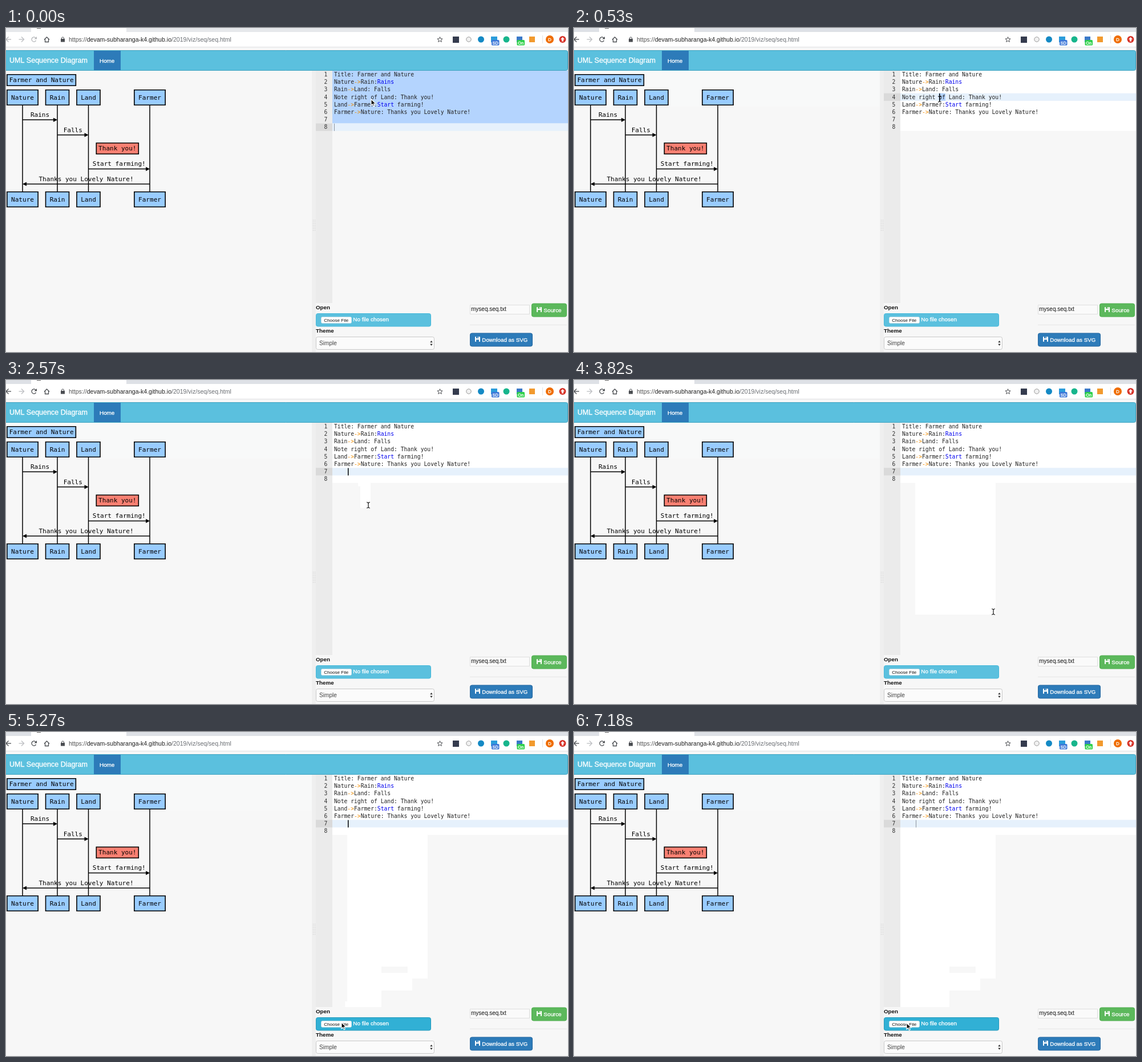
Recreate the animation shown at these times as an HTML page with a canvas. Size 985 px wide and 569 px high, loop 8000 ms.

```html
<!DOCTYPE html>
<html lang="en">
<head>
<meta charset="utf-8">
<title>UML Sequence Diagram</title>
<style>
html, body { margin: 0; width: 100%; height: 100%; overflow: hidden; background: #f7f7f7; }
canvas { display: block; }
</style>
</head>
<body>
<canvas id="stage" width="985" height="569"></canvas>
<script>
const ctx = document.getElementById('stage').getContext('2d');
const LOOP = 8000, TICK = 122, TICK_START = 52;
const FOCUS = 310, PICK = 530, CLICK = 1260, HOVER = 4440, TIP = 5850, TIP_END = 7180;
const SANS = '"Liberation Sans", Arial, sans-serif';
const MONO = '"DejaVu Sans Mono", monospace';
const PAGE = '#f7f7f7', INK = '#111', SELECT = '#b4d4fe', ACTIVE = '#e6f1fc';
const ROW_H = 13.22, ED_X = 575, ED_Y = 75, ED_FONT = '9.7px ' + MONO;
const rowTop = i => ED_Y + i * ROW_H;

const code = [
  'Title: Farmer and Nature',
  'Nature->Rain:Rains',
  'Rain->Land: Falls',
  'Note right of Land: Thank you!',
  'Land->Farmer:Start farming!',
  'Farmer->Nature: Thanks you Lovely Nature!',
  '', ''
];

// pointer key points: time, x, y
const keys = [
  [0, 640, 125], [PICK, 641, 125], [700, 641, 125], [1028, 621, 166],
  [2320, 621, 166], [2614, 645, 258], [2858, 735, 407],
  [3850, 735, 407], [3956, 708, 428], [4078, 654, 449], [4200, 603, 478], [4600, 588, 510],
  [5300, 588, 510], [5780, 579, 510], [6300, 579, 510], [6720, 583, 511], [LOOP, 583, 511]
];

function pointerAt(t) {
  const time = Math.max(0, Math.floor((t - TICK_START) / TICK) * TICK + TICK_START);
  const i = keys.findIndex(k => k[0] > time);
  const [t0, x0, y0] = keys[i - 1], [t1, x1, y1] = keys[i];
  const f = (time - t0) / (t1 - t0);
  return { x: x0 + (x1 - x0) * f, y: y0 + (y1 - y0) * f, arrow: time < FOCUS - TICK || time >= 4200 + TICK };
}

const caretOn = t => t >= TIP_END || (t + 732) % 986 < 600;

// each pointer step repaints the area between its old and new place, and the caret if it blinked
const repaints = [];
for (let t = TICK_START + 10 * TICK; t < TIP_END; t += TICK) {
  const a = pointerAt(t - TICK), b = pointerAt(t);
  if (a.x === b.x && a.y === b.y) continue;
  const r = { t, x0: Math.min(a.x, b.x) - 4, y0: Math.min(a.y, b.y) - 5,
    x1: Math.max(a.x, b.x) + 4, y1: Math.max(a.y, b.y) + 5 };
  if (caretOn(t) !== caretOn(t - TICK)) {
    r.x0 = Math.min(r.x0, 598);
    r.y0 = rowTop(6);
  }
  repaints.push(r);
}
repaints.push({ t: TIP, x0: 567, y0: rowTop(6), x1: 639, y1: 544 });

function rect(x, y, w, h, fill) {
  ctx.fillStyle = fill;
  ctx.fillRect(x, y, w, h);
}

function paint(fill, stroke, lw = 1) {
  if (fill) { ctx.fillStyle = fill; ctx.fill(); }
  if (stroke) { ctx.strokeStyle = stroke; ctx.lineWidth = lw; ctx.stroke(); }
}

function box(x, y, w, h, r, fill, stroke, lw) {
  ctx.beginPath();
  ctx.roundRect(x, y, w, h, r);
  paint(fill, stroke, lw);
}

function disc(x, y, r, fill, stroke) {
  ctx.beginPath();
  ctx.arc(x, y, r, 0, 7);
  paint(fill, stroke);
}

function path(pts, stroke, lw, fill) {
  ctx.beginPath();
  for (let i = 0; i < pts.length; i += 2) ctx.lineTo(pts[i], pts[i + 1]);
  if (fill) ctx.closePath();
  paint(fill, stroke, lw);
}

function text(s, x, y, font, fill = INK, align = 'left') {
  ctx.font = font;
  ctx.textAlign = align;
  ctx.fillStyle = fill;
  ctx.fillText(s, x, y);
  if (fill === '#fff') {
    ctx.strokeStyle = fill;
    ctx.lineWidth = .3;
    ctx.strokeText(s, x, y);
  }
}
const sans = (s, x, y, size, fill, align) => text(s, x, y, size + 'px ' + SANS, fill, align);
const bold = (s, x, y, size) => text(s, x, y, 'bold ' + size + 'px ' + SANS);

function navArrow(x, dir, color) {
  path([x - 4.5, 20, x + 4.5, 20], color, 1.3);
  path([x, 15.5, x + dir * 4.5, 20, x, 24.5], color, 1.3);
}

function badge(s, x, fill) {
  box(x, 21, 13.5, 9.5, 1.5, fill);
  sans(s, x + 6.8, 28.7, 7.5, '#fff', 'center');
}

function toolbar(t) {
  const on = t >= FOCUS, dark = '#4a4d51', ink = on ? dark : '#b5b7ba';
  rect(0, 0, 985, 33, '#fff');
  rect(0, 0, 985, 7, on ? '#dee1e6' : '#e6e8eb');
  box(44, -6, 167, 16, 4, '#fff');
  rect(54, 0, 7, 1, '#666');
  rect(0, 33, 985, 1, '#dedfe1');

  navArrow(4.5, -1, ink);
  navArrow(27, 1, '#bcbec1');
  ctx.beginPath();
  ctx.arc(49, 20, 4, 0.5, 5.6);
  paint(null, ink, 1.3);
  path([54, 15, 54, 19.5, 49.5, 19.5], null, 0, ink);
  path([67, 20.5, 71.5, 16, 76, 20.5], dark, 1.3);
  path([68.5, 19.5, 68.5, 24.5, 74.5, 24.5, 74.5, 19.5], dark, 1.3);
  rect(96, 19, 7, 5.5, dark);
  box(97.5, 16, 4, 5, 2, null, dark);

  let x = 110;
  for (const [s, c] of [['https://', '#555'], ['devam-subharanga-k4.github.io', '#222'], ['/2019/viz/seq/seq.html', '#6b6f74']]) {
    sans(s, x, 23.6, 10.55, c);
    x += ctx.measureText(s).width;
  }

  const star = [];
  for (let i = 0; i < 11; i++) {
    const a = i * Math.PI / 5 - Math.PI / 2, r = i % 2 ? 2.1 : 4.8;
    star.push(760.5 + r * Math.cos(a), 20.5 + r * Math.sin(a));
  }
  path(star, dark, 1);

  rect(783, 15, 11, 11, '#343b4e');
  disc(811, 20, 4.2, '#f1f1f1', '#999');
  disc(832.5, 20, 5.5, '#1489c4');
  rect(850, 15, 11, 10, '#2a9cdb');
  badge('SD', 851, '#3f78d8');
  disc(877, 20, 5.5, '#17b58c');
  rect(895, 15, 10, 10, '#3a79c9');
  badge('On', 895.5, '#2ed04a');
  rect(917, 15, 10, 10, '#f29a2e');
  rect(940, 13, 1, 14, '#e2e2e2');
  disc(953, 20, 7, '#ef6c00');
  sans('D', 953, 23, 8, '#fff', 'center');
  disc(975.5, 20, 6, '#d7352b');
  path([972, 20, 975.5, 16, 979, 20], null, 0, '#fff');
  rect(974, 20, 3, 3.5, '#fff');
}

function navbar() {
  box(-4.5, 39.5, 989, 35, 3, '#5bc0de', '#3fa3c0');
  rect(154, 40, 47, 34, '#2d7bb9');
  sans('UML Sequence Diagram', 6, 61.2, 12.5, '#fff');
  sans('Home', 164, 60.8, 9.9, '#fff');
}

const label = (s, x, y) => text(s, x, y + 3.8, '11.04px ' + MONO, '#000', 'center');

function node(s, cx, y, w, h, fill = '#99ccff') {
  box(cx - w / 2, y, w, h, 0, fill, '#000', 1.6);
  label(s, cx, y + h / 2);
}

function message(s, from, to, y) {
  const d = Math.sign(to - from);
  path([from, y, to - d * 4, y], '#000', 1.5);
  path([to, y, to - d * 7, y - 3.6, to - d * 7, y + 3.6], null, 0, '#000');
  label(s, (from + to) / 2, y - 9);
}

function diagram() {
  const at = { Nature: 29, Rain: 90, Land: 144.5, Farmer: 252 };
  node('Farmer and Nature', 62.1, 81.8, 120.5, 19.5);
  for (const name in at) {
    path([at[name], 135, at[name], 288], '#000', 1.5);
    for (const y of [108.8, 287.8]) node(name, at[name], y, 14.4 + 6.65 * name.length, 26.4);
  }
  message('Rains', at.Nature, at.Rain, 161.3);
  message('Falls', at.Rain, at.Land, 187.8);
  node('Thank you!', 195.3, 202, 74, 19.3, '#fa8072');
  message('Start farming!', at.Land, at.Farmer, 247.6);
  message('Thanks you Lovely Nature!', at.Farmer, at.Nature, 274);
}

function codeLine(s, x, y) {
  for (const p of s.split(/(->|(?<=:)[A-Z][a-z]+)/)) {
    const color = p === '->' ? '#f08c00' : /^(Rains|Start)$/.test(p) ? '#0000ee' : '#222';
    text(p, x, y, ED_FONT, color);
    x += ctx.measureText(p).width;
  }
}

function editor(t) {
  const row = t < PICK ? 7 : t < CLICK ? 3 : 6;
  if (t >= PICK) rect(572, ED_Y, 413, ROW_H * 8, '#fff');
  for (const r of repaints) if (t >= r.t) rect(r.x0, r.y0, r.x1 - r.x0, r.y1 - r.y0, '#fff');
  rect(543, 483, 442, 86, PAGE);

  rect(536, 75, 7, 494, '#efefef');
  for (let y = 337; y < 358; y += 3) {
    for (const x of [538, 541]) rect(x, y, 1, 1, '#c4c4c4');
  }
  rect(543, 75, 29, 408, '#ebebeb');
  rect(543, rowTop(row), 29, ROW_H, '#dadada');
  if (row === 7) rect(572, ED_Y, 413, ROW_H * 7, SELECT);
  rect(572, rowTop(row), 413, ROW_H, ACTIVE);
  if (row === 3) rect(639.2, rowTop(3), 11.7, ROW_H, SELECT);

  code.forEach((s, i) => {
    const y = rowTop(i) + 9.9;
    text(String(i + 1), 563.3, y, ED_FONT, '#333', 'right');
    codeLine(s, ED_X, y);
  });

  const faint = row === 7 || t >= TIP_END;
  const x = row === 7 ? ED_X : row === 3 ? 640 : 598.5;
  if (faint || caretOn(t)) rect(Math.round(x), rowTop(row) + .3, faint ? 1 : 1.5, 13, faint ? '#8d949c' : '#000');
}

function button(s, x, y, w, h, fill, edge, size) {
  box(x + .5, y + .5, w - 1, h - 1, 3, fill, edge);
  const ix = x + 9, iy = y + 6.5;
  box(ix, iy, 9, 9, 1, '#fff');
  rect(ix + 2, iy, 4.5, 3, fill);
  rect(ix + 4.4, iy + .4, 1.3, 2, '#fff');
  rect(ix + 2, iy + 5.3, 5, 3.7, fill);
  sans(s, x + 21.3, y + 15.5, size, '#fff');
}

function controls(t) {
  const hover = t >= HOVER;
  bold('Open', 543, 493.8, 9.8);
  box(543.5, 501.5, 201, 22.5, 3, hover ? '#31b0d5' : '#5bc0de', hover ? '#269abc' : '#46b8da');
  box(552.5, 507.5, 53, 11, 2, '#fff', '#d5dfe3', .7);
  sans('Choose File', 557.3, 516, 8.05);
  sans('No file chosen', 608.3, 515, 9.9, '#fff');
  bold('Theme', 543, 535.2, 9.8);
  box(543.5, 542.5, 207, 22, 3, '#fbfbfb', '#c9c9c9');
  sans('Simple', 549, 556.8, 10.1, '#444');
  for (const d of [-1, 1]) {
    const y = 553.5 + d * 1.2;
    path([743.3, y, 745.5, y + d * 3.3, 747.7, y], null, 0, '#333');
  }

  box(813.5, 486.5, 104, 16, 0, '#fafafa', '#dfdfdf');
  sans('myseq.seq.txt', 815, 497.3, 10);
  button('Source', 921, 483.5, 62, 24, '#5cb85c', '#4cae4c', 9.9);
  rect(813, 521, 170, 1, '#e6e6e6');
  button('Download as SVG', 813, 535.5, 110, 24, '#2d7bb9', '#2567a0', 9.8);
}

function tooltip(t) {
  if (t < TIP || t >= TIP_END) return;
  ctx.save();
  ctx.globalAlpha = Math.min(1, .6 + (t - TIP) / 300);
  ctx.shadowColor = 'rgba(0,0,0,.4)';
  ctx.shadowBlur = 4;
  ctx.shadowOffsetY = 1;
  box(574, 525.5, 61, 14, 0, '#f0f0f0');
  ctx.shadowColor = 'transparent';
  sans('No file chosen', 578.3, 535.4, 8.2);
  ctx.restore();
}

function mouse(t) {
  const { x, y, arrow } = pointerAt(t);
  ctx.save();
  ctx.translate(x, y);
  if (arrow) {
    path([0, 0, 0, 11, 2.6, 8.7, 4.4, 12.6, 6.2, 11.8, 4.5, 8, 8, 8, 0, 0], '#fff', 1.2, '#000');
  } else {
    path([0, -4.5, 0, 4.5], INK, 1.2);
    for (const d of [-1, 1]) path([-2.8, d * 5.3, 0, d * 4, 2.8, d * 5.3], INK, 1.1);
  }
  ctx.restore();
}

function draw(t) {
  rect(0, 0, 985, 569, PAGE);
  if (t >= FOCUS) rect(0, 75, 536, 63, '#f8f9f9');
  toolbar(t);
  navbar();
  diagram();
  editor(t);
  controls(t);
  tooltip(t);
  mouse(t);
}

const start = performance.now();
function tick() {
  draw((performance.now() - start) % LOOP);
  requestAnimationFrame(tick);
}
tick();
</script>
</body>
</html>
```
